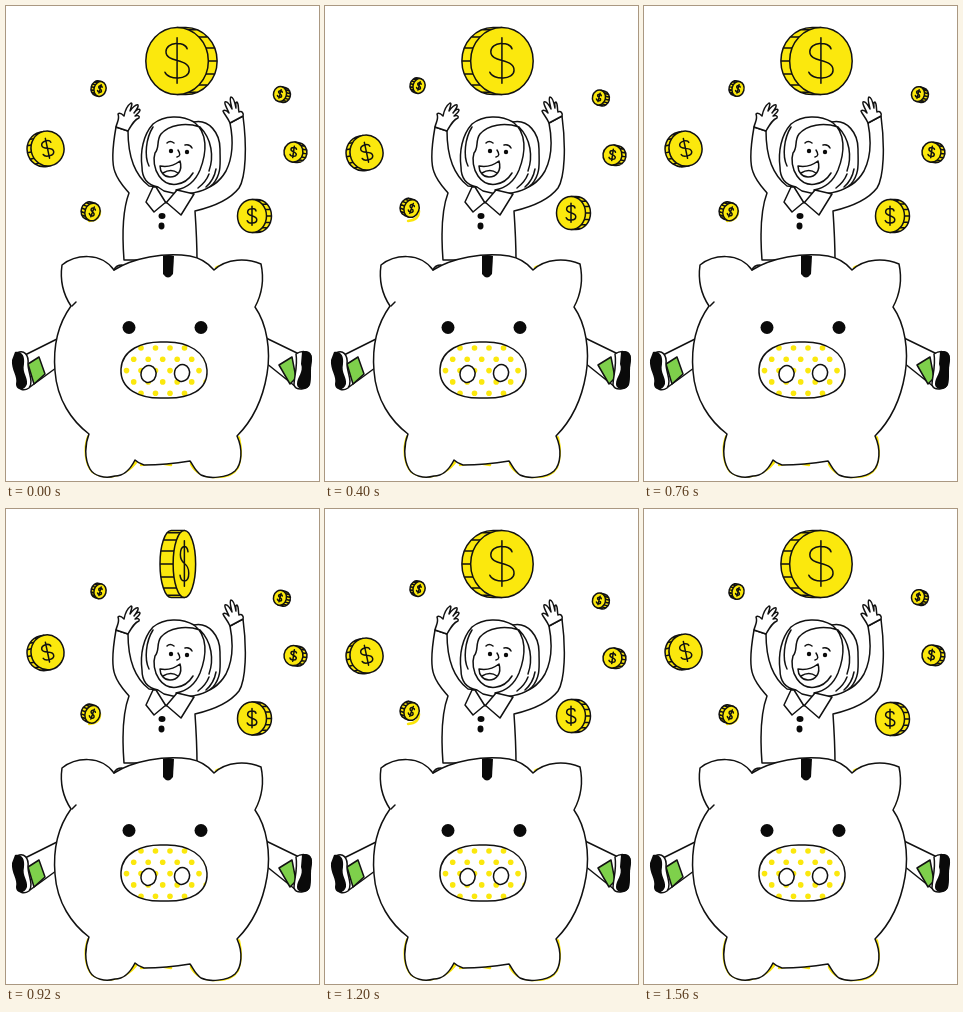
An HTML page for the animation above (1600 ms loop, 313 by 475 pixels).

```html
<!DOCTYPE html>
<html lang="en">
<meta charset="utf-8">
<title>Piggy bank</title>
<style>
  html, body { margin: 0; width: 100%; height: 100%; overflow: hidden; background: #fff; }
  svg { display: block; width: 100vw; height: 100vh; }
  .ink { fill: none; stroke: #111; stroke-width: 1.5; stroke-linecap: round; stroke-linejoin: round; }
  .ink path, .ink ellipse { vector-effect: non-scaling-stroke; }
  .paper { fill: #fff; }
  .black { fill: #0a0a0a; }
  .gold { fill: #fbe80d; }
  .glow { fill: none; stroke: #fbe60a; stroke-width: 4.5; stroke-linecap: round; stroke-linejoin: round; }
</style>
<svg viewBox="0 0 313 475">
  <!-- girl -->
  <g class="ink">
    <path class="paper" d="M110 121C107 138 105 156 109 166C112 175 118 181 123 187C117 203 116 228 118 254H191C191 236 190 220 189 205C206 201 223 195 233 182C240 171 241 140 237 110L224 117C228 137 226 153 220 165C213 177 203 183 192 184L143 180C130 170 122 152 122 125Z"/>
    <path class="paper" d="M110 121C111 116 114 113 112 108C114 106 117 109 118 110C119 105 122 99 125 97C127 97 125 101 124 105C126 102 130 98 132 99C133 101 130 104 128 107C130 104 133 102 134 104C134 106 131 108 129 110C132 109 134 110 133 112C129 113 126 118 122 125Z"/>
    <path class="paper" d="M224 117C222 112 218 108 217 105C219 103 222 106 223 107C221 102 218 98 219 96C221 95 224 99 226 103C225 98 223 92 225 91C227 91 229 97 230 102C230 99 229 96 231 96C233 98 232 103 233 106C236 104 238 108 237 110Z"/>
    <path class="paper" d="M152 181C141 179 136 172 136 161C134 146 137 129 147 118C158 109 176 109 188 116C203 113 214 127 214 143C214 157 216 167 207 178C199 186 184 188 171 188L158 185Z"/>
    <path d="M194 121C179 116 163 119 155 128C150 135 154 141 149 147C147 153 148 163 153 170C162 183 179 180 187 167M147 121C140 132 138 150 143 160M188 116C202 127 201 146 194 164C189 176 181 182 170 184M194 121C206 133 208 151 203 165M192 182Q200 176 203 168M200 181Q208 174 210 163"/>
    <path d="M161 137Q164 134 168 137M179 139Q184 138 186 142M172 144Q176 150 171 151"/>
    <path class="paper" d="M154 160Q165 162 174 155C177 165 171 171 164 171C158 171 154 166 154 160ZM157 167Q165 162 172 167"/>
    <path class="paper" d="M147 181L140 196L148 206L160 196L175 209L188 188L171 184L160 197L150 181Z"/>
  </g>
  <g class="black">
    <circle cx="165" cy="145" r="2.2"/><circle cx="181" cy="146" r="2.2"/>
    <ellipse cx="156" cy="210" rx="3.5" ry="3"/><ellipse cx="155.500" cy="220" rx="3" ry="3.400"/>
  </g>

  <!-- legs -->
  <g class="ink">
    <path class="paper" d="M55 331L19 349L24 381L54 359M258 331L293 348L290 381L260 357"/>
    <path fill="#7ed04b" d="M22 358L33 351L39 368L28 378ZM273 359L286 351L290 372L284 378Z"/>
    <path class="paper" d="M11 347C18 343 23 349 22 358C22 366 28 376 23 382C17 386 12 383 12 377ZM290 348C296 344 305 345 305 352L303 378C302 384 290 385 288 379C288 371 292 360 290 348Z"/>
  </g>
  <path class="black" d="M9 346C16 345 19 350 18 358C16 367 22 371 21 378C19 385 10 385 10 378C12 370 5 364 6 354ZM296 346C302 343 307 347 306 355C304 364 306 372 304 379C301 385 291 384 291 378C291 371 298 366 295 358Z"/>

  <!-- pig -->
  <path id="pig" class="paper" d="M108 264C127 252 158 246 184 250C195 252 203 258 208 264C221 252 241 252 255 258C258 272 256 288 249 301C261 318 265 345 261 368C257 392 247 414 231 430C237 443 236 458 229 465C221 472 203 473 195 469C189 465 187 459 184 455Q160 459 138 459Q132 457 129 454C124 464 118 470 109 470C99 473 88 470 84 463C78 452 79 438 83 428C66 415 51 394 49 365C47 341 52 318 65 300C57 288 54 273 56 259C70 248 95 246 108 264Z"/>
  <path class="glow" d="M211 262Q232 254 253 260Q256 282 249 297M73 302C52 326 50 373 66 398Q70 405 76 410M84 415h.1M83 431C79 442 80 457 87 465Q97 472 111 468Q122 465 129 456M186 458Q192 469 207 470Q225 471 231 461Q236 448 232 432"/>
  <path class="glow" style="stroke-width:2.500" d="M258 333V339M259 354h.1M135 459Q150 456 165 459"/>
  <use href="#pig" class="ink" style="fill:none"/>
  <path class="ink" d="M108 264Q110 259 116 259M66 300L70 296"/>
  <path class="black" d="M157 250Q162 248 168 250L167 268Q162 275 157 268Z"/>
  <circle class="black" cx="123" cy="321.500" r="6.500"/>
  <circle class="black" cx="195" cy="321.500" r="6.500"/>
  <clipPath id="snoutShape"><use href="#snout"/></clipPath>
  <g id="dots" class="gold" clip-path="url(#snoutShape)"></g>
  <g class="ink">
    <path id="snout" d="M115 363C116 344 136 335 158 336C183 335 200 347 201 364C202 384 184 393 158 392C133 393 114 383 115 363Z" fill="none"/>
    <ellipse class="paper" cx="142.500" cy="368" rx="7.500" ry="8.500" transform="rotate(15 142.500 368)"/>
    <ellipse class="paper" cx="176" cy="367" rx="7.500" ry="8.500" transform="rotate(15 176 367)"/>
  </g>

  <path class="glow" style="stroke-width:2.500" d="M83 215Q94 214 94 205"/>
  <g id="coins" class="ink"></g>
</svg>
<script>
const LOOP = 800, STEP = 40, SPIN = 240;
const byId = id => document.getElementById(id);

// x, y, face width and height radii, rim offset, tilt, vertical travel
const smallCoins = [
  [94, 83, 6, 7.5, -3, 15, -3],
  [274, 88, 6.5, 7.5, 4, 15, 3.5],
  [41.5, 142.5, 16.5, 17.5, -4, -12, 4],
  [287.5, 146, 9.5, 10, 4, 8, 3],
  [86.5, 206, 7.5, 9, -4, 20, -3.5],
  [246, 210, 14.5, 16.5, 5, 0, -3]
];

function coin(x, y, rx, ry, rim, tilt, glyph = 0.85) {
  const side = Math.sign(rim);
  let ridges = '';
  for (let a = -1.2; a < 1.3; a += 0.4)
    ridges += `M${side * rx * Math.cos(a)} ${ry * Math.sin(a)}h${rim}`;
  return `<g transform="translate(${x} ${y}) rotate(${tilt})">
    <path class="gold" d="M0 ${-ry}h${rim}A${rx} ${ry} 0 0 ${side > 0 ? 1 : 0} ${rim} ${ry}H0Z${ridges}"/>
    <ellipse class="gold" rx="${rx}" ry="${ry}"/>
    <path transform="scale(${glyph * rx / 31} ${glyph * ry / 33})" d="M10 -12C8 -20 -11 -19 -11 -9C-11 2 12 -3 12 9C12 19 -9 19 -12 11M0 -23V22"/>
  </g>`;
}

function bigCoin(phase) {
  const left = Math.max(0, 1 - phase / SPIN);
  const angle = (25 + 130 * left ** 1.5) * Math.PI / 180;
  const cos = Math.cos(angle);
  const rim = -Math.sign(cos) * 13.5 * Math.sqrt(Math.sin(angle));
  return coin(174 - rim / 3, 55, 34.5 * Math.abs(cos), 33.5, rim, 0, 1);
}

function draw(now) {
  const phase = Math.floor(now % LOOP / STEP) * STEP;
  const sway = (1 - Math.cos(phase / LOOP * 2 * Math.PI)) / 2;
  byId('coins').innerHTML = bigCoin(phase) + smallCoins.map(
    ([x, y, rx, ry, rim, tilt, travel]) => coin(x, y + travel * sway, rx, ry, rim, tilt)
  ).join('');
}

let dots = '';
for (let row = 0; row < 6; row++)
  for (let col = 0; col < 7; col++)
    dots += `<circle cx="${106 + col * 14.5 + row % 2 * 7.2}" cy="${342 + row * 11.3}" r="2.8"/>`;
byId('dots').innerHTML = dots;

const start = performance.now();
function tick() {
  draw(performance.now() - start);
  requestAnimationFrame(tick);
}
tick();
</script>
</html>
```
